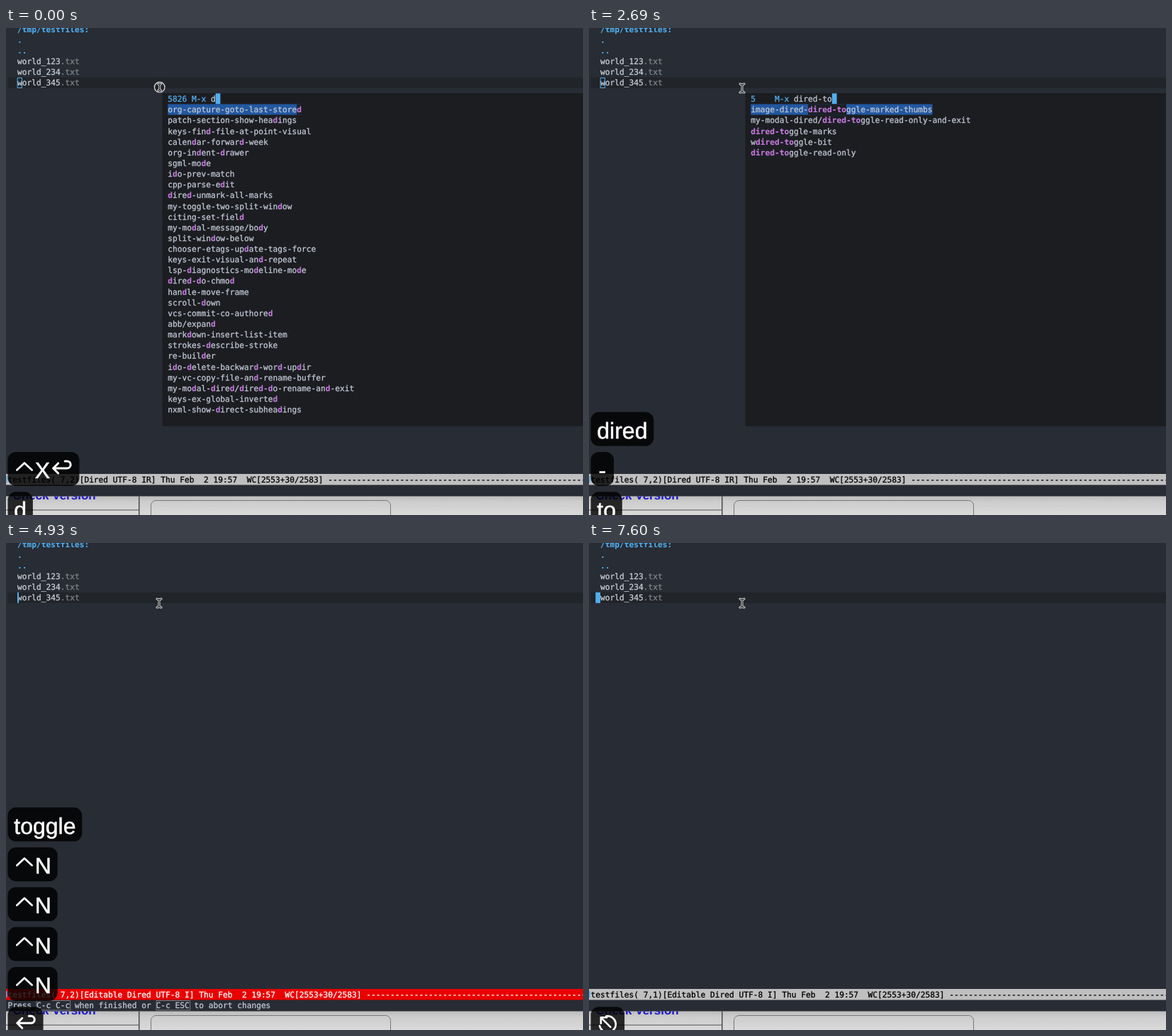
An HTML page with a canvas that plays this animation: 814 px wide and 688 px high, repeating every 8 s.

```html
<!DOCTYPE html>
<html lang="en">
<head>
<meta charset="utf-8">
<title>Command palette</title>
<style>
html, body { margin: 0; width: 100%; height: 100%; overflow: hidden; background: #282c34; }
canvas { display: block; width: 814px; height: 688px; }
</style>
</head>
<body>
<canvas id="stage" width="814" height="688"></canvas>
<script>
const ctx = document.getElementById('stage').getContext('2d');
const W = 814, H = 688, LOOP = 8000;
const CELL = 6.743, LINE = 15.14, LEFT = 2.5, ROW0 = 69.7;
const MONO = '11.2px "DejaVu Sans Mono", "Noto Sans Mono", monospace';
const SANS = '32px "Liberation Sans", Arial, sans-serif';
const C = {
  bg: '#282c34', line: '#212429', popup: '#1c1d21', match: '#1c1f24', fg: '#bfc6d2',
  blue: '#51afef', pink: '#c678dd', pick: '#2257a0', dim: '#7f8286', bar: '#bfbfbf', alert: '#e90000'
};

// The screen only refreshes at these moments.
const ticks = [0, 150, 450, 600, 900, 1050, 1200, 1940, 2540, 2690, 2840, 2990, 3130, 3280,
  3730, 3880, 4030, 4180, 4930, 5370, 5520, 5670, 5820, 5960, 6110, 6260, 6410, 6860, 7010, 7460, 7600];

const caps = [
  { text: '^X⏎', at: [-1135] },
  { text: 'dired', at: [-100, 450, 600, 900, 1200] },
  { text: '-', at: [1940] },
  { text: 'toggle', at: [2540, 2690, 2840, 2990, 3130, 3280] },
  ...[3730, 3880, 4030, 4180].map(t => ({ text: '^N', at: [t] })),
  { text: '⏎', at: [4930] },
  { text: '⎋', at: [7460] }
];
const typed = caps.slice(1, 4).flatMap(c => c.at);
const RUN = 4930, ESC = 7600;
const totals = { 1: 5826, 2: 1192, 3: 447, 4: 344, 5: 262, 6: 204, 7: 8 };

const commands = `org-capture-goto-last-stored patch-section-show-headings keys-find-file-at-point-visual
calendar-forward-week org-indent-drawer sgml-mode ido-prev-match cpp-parse-edit dired-unmark-all-marks
my-toggle-two-split-window citing-set-field my-modal-message/body split-window-below
chooser-etags-update-tags-force keys-exit-visual-and-repeat lsp-diagnostics-modeline-mode dired-do-chmod
handle-move-frame scroll-down vcs-commit-co-authored abb/expand markdown-insert-list-item
strokes-describe-stroke re-builder ido-delete-backward-word-updir my-vc-copy-file-and-rename-buffer
my-modal-dired/dired-do-rename-and-exit keys-ex-global-inverted nxml-show-direct-subheadings
dired-mark-sexp ediff-buffers tramp-crypt-add-directory add-dir-local-variable dired-jump-other-window
display-line-numbers-mode make-directory tune-play-playlist-directory org-attach-set-directory
ebnf-spool-directory diff-reverse-direction dired-async-do-symlink bookmark-edit-annotation
chooser-down-directory dirtrack-mode my-modal-dired/my-extract-mkv-subtitle-and-exit dired-clean-tex
dired-do-chown tune-play-playlist-directory-tree comint-redirect-cleanup dired-async-do-rename
list--advice-wdired-finish-edit tune-add-directory-tree dired-async-mode project-dired
dired-find-file-other-window pr-ps-directory-ps-print ido-reread-directory
my-modal-dired/captions-extract-subtitle-from-zip-and-exit tune-play-directory-tree
image-dired-display-thumbs-append wdired-next-line dired-omit-expunge dired-get-file-for-visit
epa-dired-do-encrypt image-dired-dired-with-window-configuration dired-up-directory dired-downcase
image-dired-dired-edit-comment-and-tags dired-flag-backup-files wdired-mode wdired-exit dired-kill-line
chooser-dired-jump patch-dired-am-apply-patches dired-hide-subdir dired-email
image-dired-dired-toggle-marked-thumbs my-modal-dired/dired-toggle-read-only-and-exit dired-toggle-marks
wdired-toggle-bit dired-toggle-read-only image-dired-tag-files dired-tar-list
image-dired-track-movement`.split(/\s+/);

const count = (list, t) => list.filter(x => x <= t).length;

function box(x, y, w, h, color) {
  ctx.fillStyle = color;
  ctx.fillRect(x, y, w, h);
}

// Text with a hairline stroke, to imitate heavier font smoothing.
function ink(str, x, y, color, weight) {
  ctx.fillStyle = ctx.strokeStyle = color;
  ctx.lineWidth = weight;
  ctx.fillText(str, x, y);
  ctx.strokeText(str, x, y);
}

// Puts text on the character grid; y is the top of the row.
function print(str, x, y, color, bold) {
  ctx.font = (bold ? 'bold ' : '') + MONO;
  [...str].forEach((ch, i) => { if (ch !== ' ') ink(ch, x + i * CELL, y + 11.7, color, bold ? 0.1 : 0.3); });
}

function path(width, color, points) {
  ctx.lineWidth = width;
  ctx.strokeStyle = color;
  ctx.beginPath();
  points.forEach(([x, y]) => ctx.lineTo(x, y));
  ctx.stroke();
}

function drawDesktop() {
  const top = 661.5;
  const shade = ctx.createLinearGradient(0, top, 0, H);
  shade.addColorStop(0, '#bcbcbc');
  shade.addColorStop(0.3, '#cdcdcd');
  shade.addColorStop(1, '#dadada');
  box(0, top, W, H - top, shade);
  ctx.save();
  ctx.beginPath();
  ctx.rect(0, top, W, H - top);
  ctx.clip();
  ctx.font = 'bold 17px "Liberation Sans", Arial, sans-serif';
  ctx.fillStyle = '#1c14c8';
  ctx.fillText('Check Version', 9.5, 665.5);
  box(187, top, 1.5, H, '#4a4a4a');
  box(0, 680.5, 187, 1, '#555');
  ctx.strokeStyle = '#777';
  ctx.lineWidth = 1;
  ctx.beginPath();
  ctx.roundRect(204.5, 667.5, 338, 60, 7);
  ctx.stroke();
  ctx.restore();
}

function drawBuffer(t) {
  box(LEFT, ROW0, W, LINE, C.line);
  const x = LEFT + 2 * CELL, row = n => ROW0 + n * LINE;
  ['/tmp/testfiles:', '.', '..'].forEach((s, i) => print(s, x, row(i - 5), C.blue, true));
  ['123', '234', '345'].forEach((n, i) => {
    print('world_' + n, x, row(i - 2), '#c8ccd4');
    print('.txt', x + 9 * CELL, row(i - 2), C.dim);
  });
  if (t >= ESC) {
    box(x - CELL, ROW0, CELL, LINE, C.blue);
  } else if (t >= RUN) {
    const on = t < 5370 || (t >= 5960 && t < 6410) || t >= 6860;
    if (on) box(x, ROW0, 2, LINE, C.blue);
  } else {
    ctx.strokeStyle = C.blue;
    ctx.lineWidth = 1;
    ctx.strokeRect(16.5, 70.5, 6, 14);
  }
}

function drawModeLine(t) {
  const editing = t >= RUN, red = editing && t < ESC;
  box(0, 630, W, 15.5, red ? C.alert : C.bar);
  box(0, 633, 1.5, 9, C.blue);
  const mode = editing ? 'Editable Dired UTF-8 I' : 'Dired UTF-8 IR';
  const label = `testfiles( 7,${t >= ESC ? 1 : 2})[${mode}] Thu Feb  2 19:57  WC[2553+30/2583] `;
  print(label.padEnd(122, '-'), LEFT, 630, red ? '#fff' : '#000');
  if (red && t < 6860) {
    print('Press C-c C-c when finished or C-c ESC to abort changes', LEFT, 645.4, C.fg);
    ctx.strokeStyle = '#777b82';
    ctx.lineWidth = 1;
    [6, 31].forEach(col => ctx.strokeRect(Math.round(LEFT + col * CELL) + 0.5, 646.5, 7 * CELL, 13.5));
  }
}

function drawPalette(t) {
  const x = 228.2, top = 92.4;
  const query = 'dired-toggle'.slice(0, count(typed, t));
  const hits = commands.filter(c => c.includes(query));
  const total = totals[query.length] || hits.length;
  const picked = count([3730, 3880, 4030, 4180], t);
  box(220.5, 92, W, 470.5, C.popup);
  print(String(total).padEnd(5) + 'M-x', x, top, C.blue);
  print(query, x + 9 * CELL, top, C.fg);
  box(x + (9 + query.length) * CELL, top, CELL, LINE, C.blue);
  hits.slice(0, 29).forEach((name, i) => {
    const y = top + (i + 1) * LINE;
    let col = 0;
    if (i === picked) box(x, y, name.length * CELL, LINE, C.pick);
    name.split(query).forEach((part, k) => {
      if (k) {
        box(x + col * CELL, y, query.length * CELL, LINE, C.match);
        print(query, x + col * CELL, y, C.pink, true);
        col += query.length;
      }
      print(part, x + col * CELL, y, C.fg);
      col += part.length;
    });
  });
}

function drawPointer(t) {
  const pressed = t < 150;
  const x = pressed ? 216.7 : 216, y = pressed ? 83.7 : 85;
  const h = pressed ? 4.5 : 6, w = pressed ? 2 : 3;
  if (pressed) {
    ctx.beginPath();
    ctx.arc(x, y, 7.3, 0, 7);
    ctx.fillStyle = '#222429';
    ctx.fill();
    ctx.strokeStyle = '#e4e4e4';
    ctx.lineWidth = 1.2;
    ctx.stroke();
  }
  [[3, '#ddd'], [1.1, '#111']].forEach(([width, color]) => {
    path(width, color, [[x, y - h + 1], [x, y + h - 1]]);
    [-1, 1].forEach(s => path(width, color, [[x - w, y + s * h], [x, y + s * (h - 1)], [x + w, y + s * h]]));
  });
}

const icons = {
  '^': { w: 29.5, draw: (x, y) => path(2.7, '#fff', [[x + 4, y + 25.5], [x + 14.7, y + 15.5], [x + 25.4, y + 25.5]]) },
  '⏎': { w: 32.5, draw(x, y) {
    ctx.lineWidth = 3;
    ctx.strokeStyle = '#fff';
    ctx.beginPath();
    ctx.moveTo(x + 21, y + 13);
    ctx.lineTo(x + 24, y + 13);
    ctx.arcTo(x + 29, y + 13, x + 29, y + 18, 5);
    ctx.arcTo(x + 29, y + 23, x + 24, y + 23, 5);
    ctx.lineTo(x + 5, y + 23);
    ctx.stroke();
    path(3, '#fff', [[x + 11.5, y + 16], [x + 4.5, y + 23], [x + 11.5, y + 30]]);
  } },
  '⎋': { w: 30, draw(x, y) {
    const cx = x + 15, cy = y + 24.5;
    ctx.lineWidth = 2.6;
    ctx.strokeStyle = '#fff';
    ctx.beginPath();
    ctx.arc(cx, cy, 11.5, -1.75, 2.95);
    ctx.stroke();
    path(2.6, '#fff', [[cx + 4, cy + 4], [cx - 9, cy - 9]]);
    path(2.6, '#fff', [[cx - 9.5, cy - 1], [cx - 9.5, cy - 9.5], [cx - 1, cy - 9.5]]);
  } }
};

function drawCap(text, y, alpha) {
  ctx.font = SANS;
  const chars = [...text];
  const width = ch => icons[ch] ? icons[ch].w : ctx.measureText(ch).width;
  const inner = chars.reduce((sum, ch) => sum + width(ch), 0);
  const w = Math.max(32.5, inner + 17.6);
  ctx.save();
  ctx.globalAlpha = alpha;
  ctx.fillStyle = 'rgba(0,0,0,.82)';
  ctx.beginPath();
  ctx.roundRect(LEFT, y, w, 48, 11.5);
  ctx.fill();
  let x = LEFT + (w - inner) / 2;
  chars.forEach(ch => {
    if (icons[ch]) icons[ch].draw(x, y);
    else ink(ch, x, y + 37, '#fff', 0.5);
    x += width(ch);
  });
  ctx.restore();
}

function drawCaps(t) {
  const shown = caps.filter(c => c.at[0] <= t);
  shown.forEach((cap, i) => {
    const n = count(cap.at, t);
    const age = t - cap.at[n - 1];
    const alpha = Math.min(1, 1 - (age - 1900) / 180);
    const text = cap.at.length > 1 ? cap.text.slice(0, n) : cap.text;
    if (alpha > 0) drawCap(text, 655.3 - 56.35 * (shown.length - 1 - i), alpha);
  });
}

function render(t) {
  box(0, 0, W, H, C.bg);
  drawDesktop();
  drawBuffer(t);
  drawModeLine(t);
  if (t < RUN) drawPalette(t);
  drawPointer(t);
  drawCaps(t);
}

ctx.textRendering = 'geometricPrecision';
ctx.lineCap = ctx.lineJoin = 'round';
let last = -1;
function loop() {
  const t = performance.now() % LOOP;
  const tick = ticks[count(ticks, t) - 1];
  if (tick !== last) render(last = tick);
  requestAnimationFrame(loop);
}
loop();
</script>
</body>
</html>
```
